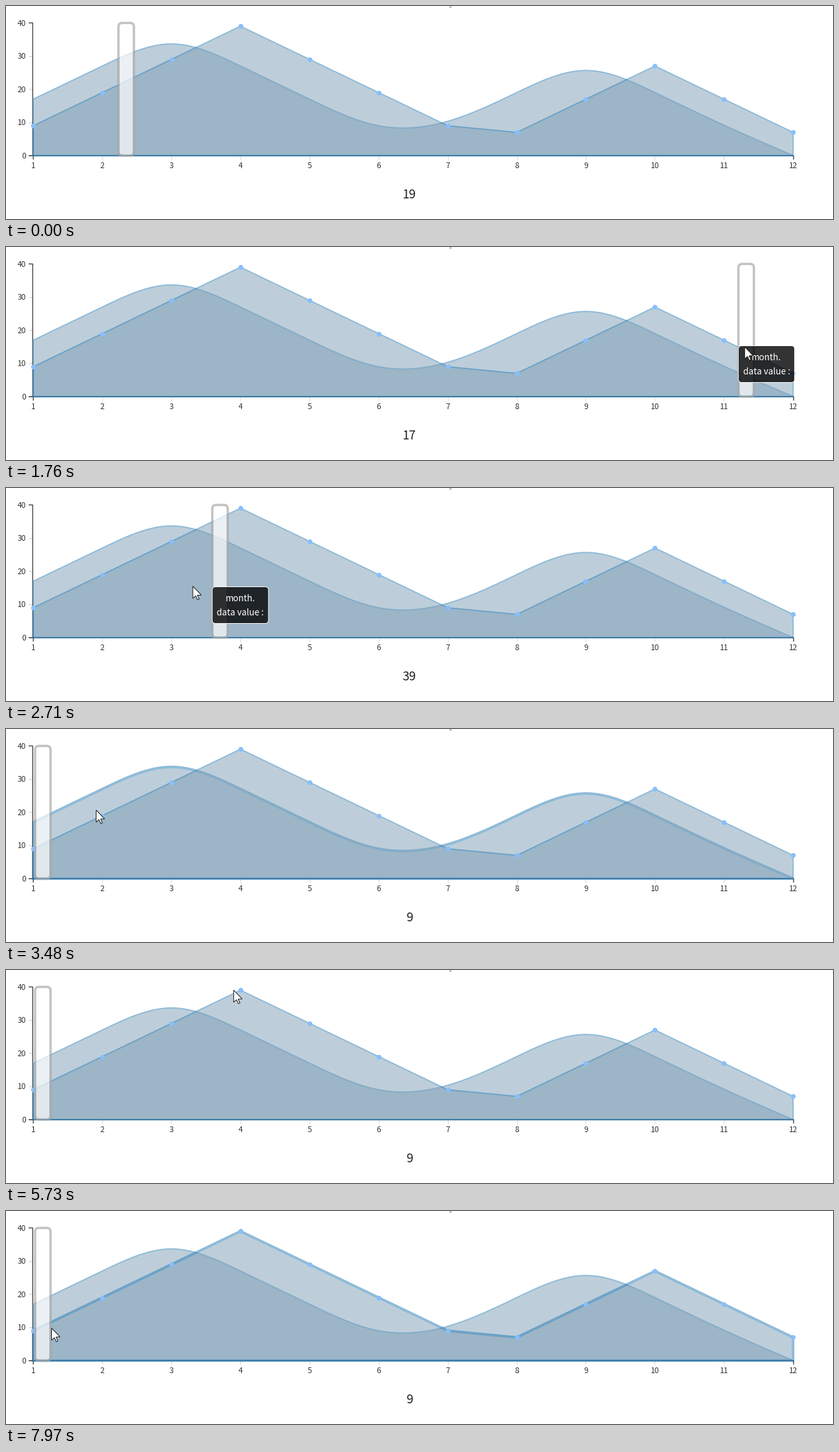
These frames come from a looping animation (1280 by 331 pixels, 8000 ms). A matplotlib script:

```python
import numpy as np
import matplotlib.pyplot as plt
from matplotlib.animation import FuncAnimation
from matplotlib.patches import FancyBboxPatch, Polygon

W, H, DPI = 1280, 331, 100
LOOP, STEP = 8000, 40
PT = 72 / DPI
LEFT, RIGHT, TOP, BASE = 42.2, 1218.2, 26.3, 232.5
FONT = "Noto Sans CJK JP"
STROKE = "#1f77b4"
FILL = (123 / 255, 157 / 255, 181 / 255)
THIN, THICK = 2 * PT, 4 * PT
KNOB_W = 24
KNOB_MIN, KNOB_MAX = 45, 1191
TIP_H = 57

LINE = [9, 19, 29, 39, 29, 19, 9, 7, 17, 27, 17, 7]
SMOOTH = [17, 27, 37, 27, 17, 7, 9, 19, 29, 19, 9, 0]

# drags of the knob, there and back: start and end time
THERE, BACK = (900, 1884), (2190, 2982)
TIP_SPAN = (970, 3250)

# eased moves: time span, then the place reached
KNOB_START = (174,)
KNOB_MOVES = [(THERE, (KNOB_MAX,)), (BACK, (KNOB_MIN,))]
POINTER_START = (236, 306)
POINTER_MOVES = [
    ((70, 820), (186, 157)),
    (THERE, (1200, 154)),
    (BACK, (2, 151)),
    ((3030, 3490), (139, 125)),
    ((3490, 4400), (243, 104)),
    ((4700, 4934), (257, 83)),
    ((5170, 5580), (350, 28)),
    ((5720, 5880), (358, 38)),
    ((5990, 6074), (365, 34)),
    ((6302, 6868), (782, 186)),
    ((6950, 7200), (785, 204)),
    ((7270, 7366), (791, 197)),
    ((7500, 7974), (70, 181)),
]

ARROW = np.array([(0.5, 1), (0.5, 19.8), (4.9, 15.8), (7.8, 22),
                  (10.3, 20.9), (7.5, 14.9), (13.6, 14.6)])


def sx(month):
    return LEFT + (np.asarray(month) - 1) * (RIGHT - LEFT) / 11


def sy(value):
    return BASE - np.asarray(value) * (BASE - TOP) / 40


def basis_curve(points, n=16):
    """Uniform cubic B-spline that starts and ends on the end points."""
    p = np.vstack([points[:1]] * 2 + [points] + [points[-1:]] * 2)
    u = np.linspace(0, 1, n)[:, None]
    weights = ((1 - u) ** 3, 3 * u**3 - 6 * u**2 + 4,
               -3 * u**3 + 3 * u**2 + 3 * u + 1, u**3)
    spans = [sum(w * p[i + j] for j, w in enumerate(weights)) / 6
             for i in range(len(p) - 3)]
    return np.vstack(spans)


def fade(alpha):
    """Opacity for fill and stroke taken together."""
    def apply(image, dpi):
        image = image.copy()
        image[..., 3] *= alpha
        return image, 0, 0
    return apply


fig = plt.figure(figsize=(W / DPI, H / DPI), dpi=DPI, facecolor="white")
ax = fig.add_axes([0, 0, 1, 1])
ax.set_xlim(0, W)
ax.set_ylim(H, 0)
ax.axis("off")


def label(x, y, text, size, color="#333333", ha="center", z=2):
    """Text whose digits are centred on y."""
    return ax.text(x, y + 0.365 * size, text, fontsize=size * PT, color=color,
                   family=FONT, ha=ha, va="baseline", zorder=z)


def stroke(xs, ys, color, width=1, snap=None):
    ax.plot(xs, ys, color=color, lw=width * PT, zorder=1, snap=snap,
            solid_capstyle="butt", solid_joinstyle="miter")


def area(points, z):
    outline = np.vstack([points, [(RIGHT, BASE), (LEFT, BASE)]])
    patch = Polygon(outline, closed=True, fc=FILL, ec=STROKE, lw=THIN,
                    joinstyle="miter", zorder=z)
    patch.set_agg_filter(fade(0.5))
    return ax.add_patch(patch)


def rounded(x, y, w, h, radius, z, **style):
    box = FancyBboxPatch((x, y), w, h, zorder=z, **style,
                         boxstyle=f"round,pad=0,rounding_size={radius}")
    return ax.add_patch(box)


# axes
for value in range(0, 41, 10):
    y = float(sy(value))
    stroke([35, 41], [y, y], "#cccccc")
    label(31, y, str(value), 12, ha="right")
for month in range(1, 13):
    x = float(sx(month))
    stroke([x, x], [BASE, BASE + 6], "#d8d8d8")
    label(x, 247.5, str(month), 12)
stroke([35, 41.4, 41.4, 35], [TOP, TOP, BASE, BASE], "#333333", 1.25, False)
stroke([LEFT, LEFT, RIGHT + 0.8, RIGHT + 0.8],
       [BASE + 6, BASE, BASE, BASE + 6], "#333333", 1.25, False)
stroke([0, W], [330.5, 330.5], "#d6d6d6")
stroke([686, 689], [0.5, 0.5], "#555555")

# series
months = np.arange(1, 13)
line_pts = np.column_stack([sx(months), sy(LINE)])
curve_pts = basis_curve(np.column_stack([sx(months), sy(SMOOTH)]))
curve_area = area(curve_pts, 3)
line_area = area(line_pts, 4)
ax.plot(*line_pts.T, "o", ms=7.4 * PT, mfc="#87bffb", mew=0, zorder=5)

# moving parts
knob = rounded(*KNOB_START, TOP, KNOB_W, BASE - TOP, 6, 6,
               fc="white", ec="#a9a9a9", lw=3.6 * PT)
knob.set_agg_filter(fade(0.7))
readout = label(624, 292, "", 19, "#222222")
tip = rounded(0, 0, 87, TIP_H, 5, 8, fc=(0, 0, 0, 0.8), ec="white", lw=PT)
tip_top = label(0, 0, "", 13.5, "white", z=9)
tip_low = label(0, 0, "", 13.5, "white", z=9)
cursor = ax.add_patch(Polygon(ARROW, closed=True, fc="white", ec="#1a1a1a",
                              lw=PT, joinstyle="miter", zorder=10))


def track(start, moves, t):
    """Place at time t after a chain of smoothly eased moves."""
    place = np.array(start, float)
    for (begin, end), goal in moves:
        u = np.clip((t - begin) / (end - begin), 0, 1)
        place += (np.array(goal) - place) * u * u * (3 - 2 * u)
    return place


def show_tip(x, y, month="", value=""):
    width = 87 + 10 * len(str(value))
    tip.set_bounds(x, y, width, TIP_H)
    rows = ((tip_top, f"month. {month}", 18), (tip_low, f"data value : {value}", 40))
    for text, words, dy in rows:
        text.set_text(words.strip())
        text.set_position((x + width / 2, y + dy + 5))


def hovered(x, y, knob_x):
    """What lies under the pointer: a dot index, 'line', 'curve' or None."""
    gap = np.hypot(*(line_pts - (x, y)).T)
    if gap.min() < 4.5:
        return int(gap.argmin())
    over_knob = knob_x < x < knob_x + KNOB_W
    if over_knob or not (LEFT < x < RIGHT and y < BASE):
        return None
    if y > np.interp(x, *line_pts.T):
        return "line"
    if y > np.interp(x, *curve_pts.T):
        return "curve"
    return None


def draw(i):
    # the pointer is sampled about every 76 ms
    t = 70 + 76 * ((i * STEP + STEP - 1 - 55) // 76)
    x, y = track(POINTER_START, POINTER_MOVES, t)
    knob_x, = track(KNOB_START, KNOB_MOVES, t)
    dragging = TIP_SPAN[0] <= t < TIP_SPAN[1]

    knob.set_bounds(knob_x, TOP, KNOB_W, BASE - TOP)
    month = round(1 + (knob_x + KNOB_W / 2 - LEFT) * 11 / (RIGHT - LEFT))
    readout.set_text(str(LINE[month - 1]))

    cursor.set_visible(t >= 70)
    cursor.set_xy(ARROW + (x, y))

    target = None if dragging or t < 70 else hovered(x, y, knob_x)
    curve_area.set_linewidth(THICK if target == "curve" else THIN)
    line_area.set_linewidth(THICK if target == "line" else THIN)

    on_dot = isinstance(target, int)
    for part in (tip, tip_top, tip_low):
        part.set_visible(dragging or on_dot)
    if dragging:
        show_tip(knob_x, 153.5)
    elif on_dot:
        show_tip(x + 11.5, y - 12, target + 1, LINE[target])
    return []


anim = FuncAnimation(fig, draw, frames=LOOP // STEP, interval=STEP,
                     init_func=lambda: draw(0), repeat=True, repeat_delay=0)
plt.show()
```
